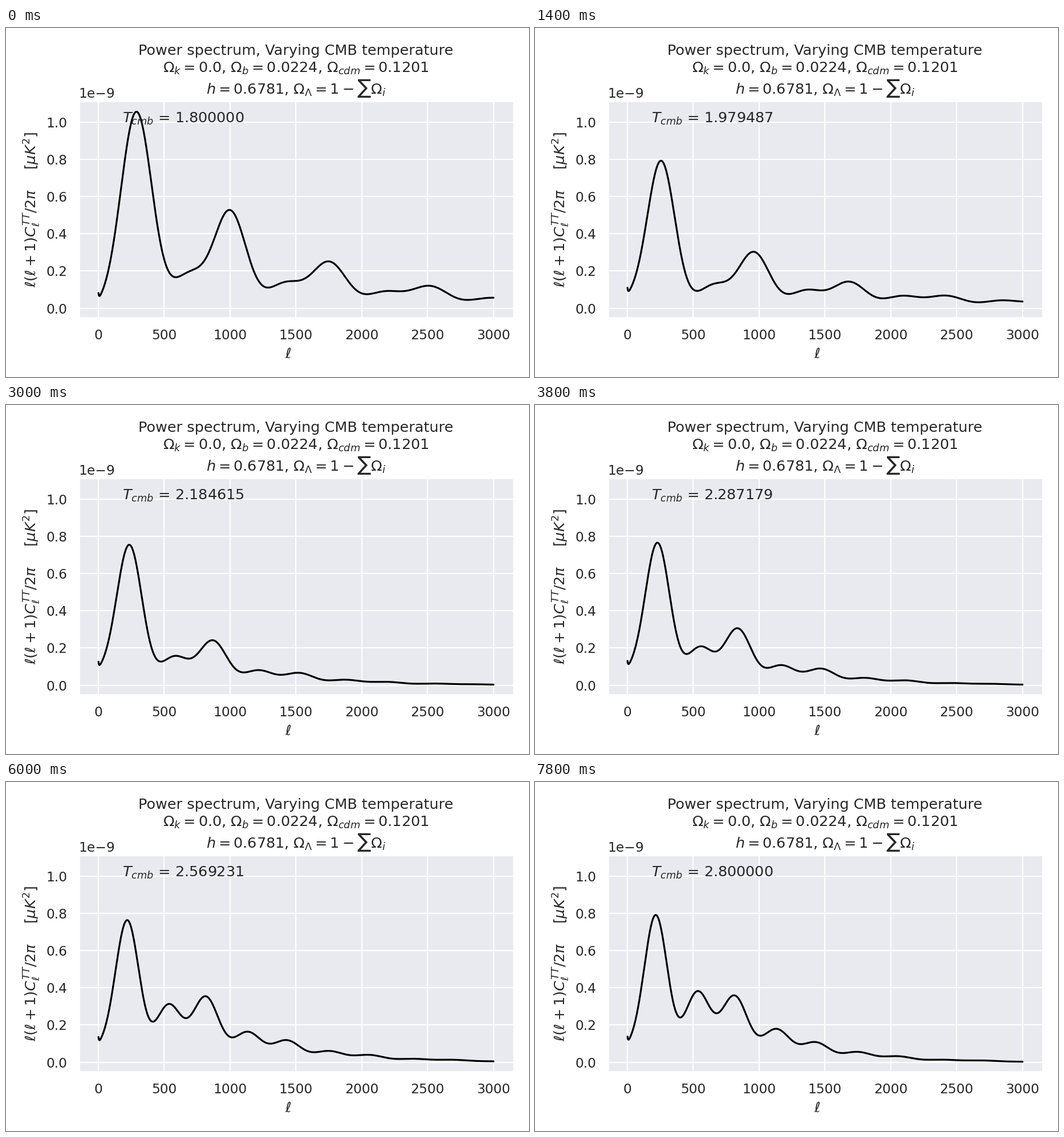
Recreate the animation shown at these times as a matplotlib script. Size 917 px wide and 611 px high, loop 8000 ms.

```python
import matplotlib.pyplot as plt
import numpy as np
from matplotlib.animation import FuncAnimation

W, H, DPI = 917, 611, 152.8
FRAMES, INTERVAL = 40, 200
INK = "#262626"

plt.rcParams.update({
    "font.family": "DejaVu Sans",
    "mathtext.fontset": "dejavusans",
    "text.color": INK,
    "axes.labelcolor": INK,
    "xtick.color": INK,
    "ytick.color": INK,
})

ell = np.arange(2, 3001)

# Acoustic peaks 2 to 10 at the hottest temperature.
PEAKS = [533, 814, 1130, 1427, 1745, 2050, 2380, 2680, 2990]

# temperature, first peak, odd peaks, even peaks, odd damping, even damping
KEYS = np.array([
    [1.800, 1055, 522, 172, 0.75, 0.28],
    [1.979, 783, 300, 120, 0.76, 0.25],
    [2.082, 741, 212, 115, 1.20, 0.55],
    [2.287, 745, 302, 200, 1.24, 0.65],
    [2.467, 736, 337, 269, 1.12, 0.63],
    [2.800, 765, 352, 374, 1.21, 0.76],
])
KEY_T, KEY_V = KEYS[:, 0], KEYS[:, 1:]
KEY_SLOPE = np.gradient(KEY_V, KEY_T, axis=0, edge_order=2)


def settings(temp):
    """Cubic Hermite interpolation between the key temperatures."""
    i = np.clip(np.searchsorted(KEY_T, temp) - 1, 0, len(KEY_T) - 2)
    h = KEY_T[i + 1] - KEY_T[i]
    s = (temp - KEY_T[i]) / h
    blend = s * s * (3 - 2 * s)
    return (KEY_V[i] * (1 - blend) + KEY_V[i + 1] * blend
            + h * s * (1 - s) * ((1 - s) * KEY_SLOPE[i] - s * KEY_SLOPE[i + 1]))


def bump(center, width):
    return np.exp(-0.5 * ((ell - center) / width) ** 2)


def spectrum(temp):
    """First peak, low plateau and a damped train of odd and even peaks."""
    first, odd, even, odd_damp, even_damp = settings(temp)
    stretch = 0.24 / (1 + np.exp((temp - 2.09) / 0.1))
    center = 215 + 75 * np.exp((1.8 - temp) / 0.32)
    plateau = 70 * (1 - np.exp((1.8 - temp) / 0.2))

    power = first * bump(center, 0.405 * center) + plateau * bump(0, 150)
    power += 30 * np.exp((2 - ell) / 4)
    for n, peak in enumerate(PEAKS):
        m = n // 2
        width = (1 + stretch) * (97 + 0.012 * (peak - PEAKS[0]))
        if n % 2:
            height, shift = odd * np.exp(-odd_damp * m), 0
        else:
            height, shift = even * np.exp(-even_damp * m ** 1.35), 140 * stretch
        power += height * bump((1 + stretch) * peak + shift, width)
    return power * 1e-12


# The tiny surplus keeps the canvas from rounding down a pixel.
fig = plt.figure(figsize=((W + 1e-6) / DPI, (H + 1e-6) / DPI), dpi=DPI,
                 facecolor="white")
left, right, top, bottom = 127.5, 889.5, 128.5, 507.1
ax = fig.add_axes([left / W, 1 - bottom / H,
                   (right - left) / W, (bottom - top) / H],
                  facecolor="#E9EAF0")
ax.set_axisbelow(True)
ax.grid(color="white", lw=1, solid_capstyle="round")
for spine in ax.spines.values():
    spine.set(color="white", linewidth=1.25)

ax.set_xlim(-147.9, 3149.9)
ax.set_ylim(-0.0505e-9, 1.111e-9)
ax.set_xticks(np.arange(0, 3001, 500))
ax.set_yticks(np.arange(6) * 0.2e-9)
ax.tick_params(length=0, pad=9.5, labelsize=11)
ax.yaxis.get_offset_text().set_fontsize(11)

title = [
    (47, "Power spectrum, Varying CMB temperature"),
    (78, r"$\Omega_k = 0.0$, $\Omega_b = 0.0224$, $\Omega_{cdm} = 0.1201$"),
    (114.5, r"$h = 0.6781$, $\Omega_\Lambda = 1 - \sum\Omega_i$"),
]
for base, text in title:
    fig.text((left + right) / 2 / W, 1 - base / H, text, fontsize=12,
             ha="center", va="baseline")
ax.set_xlabel(r"$\ell$", fontsize=12, x=0.4825)
ax.set_ylabel(r"$\ell(\ell+1)C_\ell^{TT}/2\pi \quad\;\, [\mu K^2]$",
              fontsize=12)

line, = ax.plot([], [], color="black", lw=1.5, solid_capstyle="round")
label = ax.text(0.1, 0.902, "", transform=ax.transAxes, fontsize=12)


def update(frame):
    temp = 1.8 + frame / (FRAMES - 1)
    line.set_data(ell, spectrum(temp))
    label.set_text(f"$T_{{cmb}}$ = {temp:f}")
    return line, label


anim = FuncAnimation(fig, update, frames=FRAMES, interval=INTERVAL,
                     repeat=True, repeat_delay=0)
plt.show()
```
